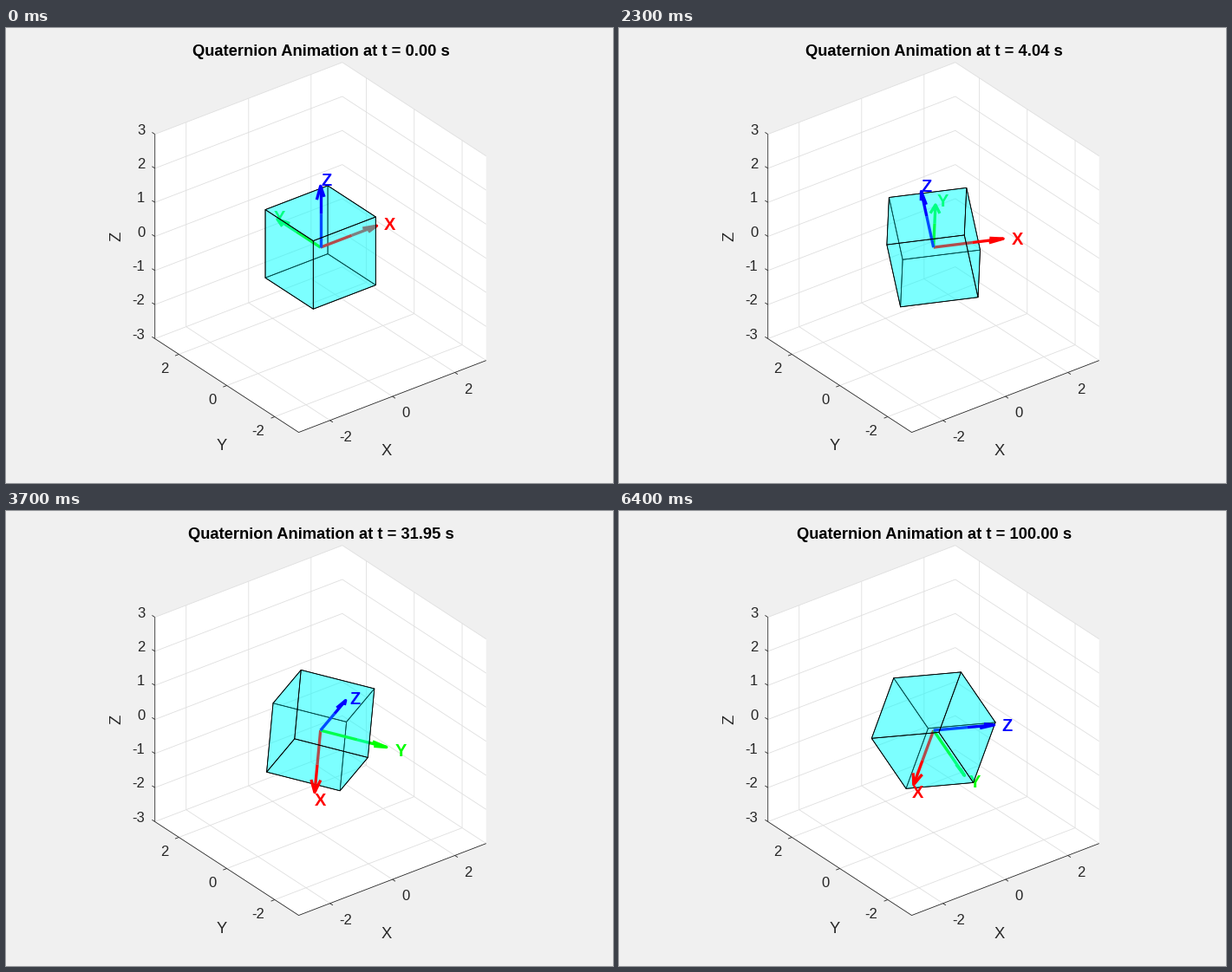
These frames come from a looping animation (700x525 px, 6500 ms). A matplotlib script:

```python
import numpy as np
import matplotlib.pyplot as plt
from matplotlib.animation import FuncAnimation
from matplotlib.collections import LineCollection, PolyCollection

W, H, DPI = 700, 525, 100
FRAMES, INTERVAL = 65, 100
PT = 72 / DPI
INK, GRID = "#262626", "#dfdfdf"
THIN, THICK = 0.83 * PT, 3.33 * PT

# Orthographic camera: azimuth -37.5, elevation 30
SCALE, CENTER = 45.4, np.array([362.2, 252.6])
AZ, EL = np.radians(-37.5), np.radians(30)
RIGHT = np.array([np.cos(AZ), np.sin(AZ), 0])
UP = np.array([-np.sin(AZ) * np.sin(EL), np.cos(AZ) * np.sin(EL), np.cos(EL)])
TOWARD = np.array([np.sin(AZ) * np.cos(EL), -np.cos(AZ) * np.cos(EL), np.sin(EL)])


def project(p):
    p = np.asarray(p, float)
    return CENTER + SCALE * np.stack([p @ RIGHT, -(p @ UP)], axis=-1)


# Solver times: adaptive steps growing fivefold, then capped at 10 s,
# each step split into four frames
h = 0.0020095
STEP_ENDS = np.array([0, h, 6 * h, 31 * h, 156 * h, 781 * h, 4.87, 10.36]
                     + [19.45 + 10 * k for k in range(8)] + [100])
TIMES = np.interp(np.arange(FRAMES) / 4, np.arange(17), STEP_ENDS)

# Attitude knots: time, rotation vector, body rates
KNOTS = np.array([
    [0.0, 0, 0, 0, -0.010, -0.075, -0.200],
    [0.6275, -0.0085, -0.047, -0.121, 0.000, -0.071, -0.190],
    [10.36, 0.314, -0.133, -1.405, -0.003, 0.033, -0.085],
    [31.95, 0.407, 0.716, -2.105, -0.018, 0.009, -0.018],
    [51.95, 0.252, 1.171, -2.108, -0.013, 0.001, -0.0052],
    [71.95, 0.102, 1.368, -2.026, -0.0082, -0.0014, -0.0017],
    [100.0, -0.050, 1.510, -1.911, -0.0048, -0.0021, -0.0004],
])


def to_quat(v):
    angle = np.linalg.norm(v)
    return np.append(np.cos(angle / 2), 0.5 * v * np.sinc(angle / 2 / np.pi))


def quat_rate(q, w):
    return 0.5 * np.append(-q[1:] @ w, q[0] * w + np.cross(q[1:], w))


QUATS = np.array([to_quat(k[1:4]) for k in KNOTS])
RATES = np.array([quat_rate(q, k[4:]) for q, k in zip(QUATS, KNOTS)])


def rotation(t):
    """Rotation matrix at time t from a cubic Hermite quaternion path."""
    i = min(np.searchsorted(KNOTS[:, 0], t, side="right") - 1, len(KNOTS) - 2)
    span = KNOTS[i + 1, 0] - KNOTS[i, 0]
    s = (t - KNOTS[i, 0]) / span
    q = ((2 * s**3 - 3 * s**2 + 1) * QUATS[i]
         + (s**3 - 2 * s**2 + s) * span * RATES[i]
         + (3 * s**2 - 2 * s**3) * QUATS[i + 1]
         + (s**3 - s**2) * span * RATES[i + 1])
    w, x, y, z = q / np.linalg.norm(q)
    return np.array([
        [1 - 2 * (y * y + z * z), 2 * (x * y - w * z), 2 * (x * z + w * y)],
        [2 * (x * y + w * z), 1 - 2 * (x * x + z * z), 2 * (y * z - w * x)],
        [2 * (x * z - w * y), 2 * (y * z + w * x), 1 - 2 * (x * x + y * y)],
    ])


fig = plt.figure(figsize=(W / DPI, H / DPI), dpi=DPI, facecolor="#f0f0f0")
ax = fig.add_axes([0, 0, 1, 1])
ax.set_xlim(-0.5, W - 0.5)
ax.set_ylim(H - 0.5, -0.5)
ax.axis("off")


def label(x, y, s, px, ha="center", **kw):
    """Text whose capitals are vertically centred on y."""
    return ax.text(x, y + 0.344 * px, s, fontsize=px * PT, ha=ha, va="baseline",
                   family="Liberation Sans", **kw)


def lines(segments, color, z):
    ax.add_collection(LineCollection([project(s) for s in segments], colors=color,
                                     linewidths=THIN, zorder=z))


def draw_box():
    hull = [(-3, 3, 3), (3, 3, 3), (3, -3, 3), (3, -3, -3), (-3, -3, -3), (-3, 3, -3)]
    ax.add_collection(PolyCollection([project(hull)], facecolors="white",
                                     edgecolors="none", zorder=0))
    grid = []
    for v in (-2, 0, 2):
        grid.append([(v, -3, -3), (v, 3, -3), (v, 3, 3)])
        grid.append([(-3, v, -3), (3, v, -3), (3, v, 3)])
    for v in range(-3, 4):
        grid.append([(-3, 3, v), (3, 3, v), (3, -3, v)])
    lines(grid, GRID, 1)

    d = 0.12
    frame = [[(-3, 3, 3), (-3, 3, -3), (-3, -3, -3), (3, -3, -3)]]
    for v in (-2, 0, 2):
        frame.append([(v, -3, -3), (v, -3 - d, -3)])
        frame.append([(-3, v, -3), (-3 - d, v, -3)])
        x, y = project((v, -3, -3))
        label(x + 10.8, y + 18.5, str(v), 16.67, "left", color=INK)
        x, y = project((-3, v, -3))
        label(x - 12, y + 16, str(v), 16.67, "right", color=INK)
    for v in range(-3, 4):
        frame.append([(-3, 3, v), (-3, 3 + d, v)])
        x, y = project((-3, 3, v))
        label(160, y - 5.5, str(v), 16.67, "right", color=INK)
    lines(frame, INK, 2)
    label(438, 486, "X", 18.33, color=INK)
    label(248, 480, "Y", 18.33, color=INK)
    ax.text(126 + 6.3, 240, "Z", fontsize=18.33 * PT, family="Liberation Sans",
            color=INK, rotation=90, rotation_mode="anchor", ha="center", va="baseline")


draw_box()
title = label(362.6, 25, "", 18.33, weight="bold", color="black")


def cube_layer(z):
    fill = PolyCollection([], facecolors=(0, 1, 1, 0.3), edgecolors="none", zorder=z)
    edge = PolyCollection([], facecolors="none", edgecolors="black",
                          linewidths=THIN, zorder=z + 0.5)
    ax.add_collection(fill)
    ax.add_collection(edge)
    return fill, edge


BEHIND, BACK, INSIDE, FRONT, ABOVE = 4, 5, 6, 7, 9
back, front = cube_layer(BACK), cube_layer(FRONT)


def stroke(color, z):
    return ax.plot([], [], color=color, lw=THICK, zorder=z,
                   solid_capstyle="butt", solid_joinstyle="round")[0]


COLORS = [(1, 0, 0), (0, 1, 0), (0, 0, 1)]
shafts = [stroke(c, INSIDE) for c in COLORS]
tips = [stroke(c, ABOVE) for c in COLORS]
heads = [stroke(c, ABOVE) for c in COLORS]
names = [label(0, 0, s, 20, "left", weight="bold", color=c)
         for s, c in zip("XYZ", COLORS)]

LENGTH, HEAD, HALF = 1.8, 0.36, 0.12


def head_points(a):
    side = np.array([a[1], -a[0], 0])
    size = np.linalg.norm(side)
    side = side / size if size > 1e-6 else np.array([1.0, 0, 0])
    base = (LENGTH - HEAD) * a
    return [base + HALF * side, LENGTH * a, base - HALF * side]


def draw(i):
    t = TIMES[i]
    axes = rotation(t).T
    title.set_text(f"Quaternion Animation at t = {t:.2f} s")

    faces = {True: [], False: []}
    for k in range(3):
        n, u, v = axes[k], axes[(k + 1) % 3], axes[(k + 2) % 3]
        for sign in (1, -1):
            quad = [sign * n + u + v, sign * n - u + v, sign * n - u - v, sign * n + u - v]
            faces[bool(sign * (n @ TOWARD) > 0)].append(project(quad))
    for layer, facing in ((back, False), (front, True)):
        for part in layer:
            part.set_verts(faces[facing])

    for k, a in enumerate(axes):
        z = ABOVE if a @ TOWARD > 0 else BEHIND
        shafts[k].set_data(*project([0 * a, a]).T)
        tips[k].set_data(*project([a, LENGTH * a]).T)
        heads[k].set_data(*project(head_points(a)).T)
        x, y = project(2 * a)
        names[k].set_position((x + 1, y + 1 + 0.344 * 20))
        for part in (tips[k], heads[k], names[k]):
            part.set_zorder(z)
    return []


anim = FuncAnimation(fig, draw, frames=FRAMES, interval=INTERVAL, repeat=True,
                     repeat_delay=0, init_func=lambda: draw(0), blit=False)
plt.show()
```
